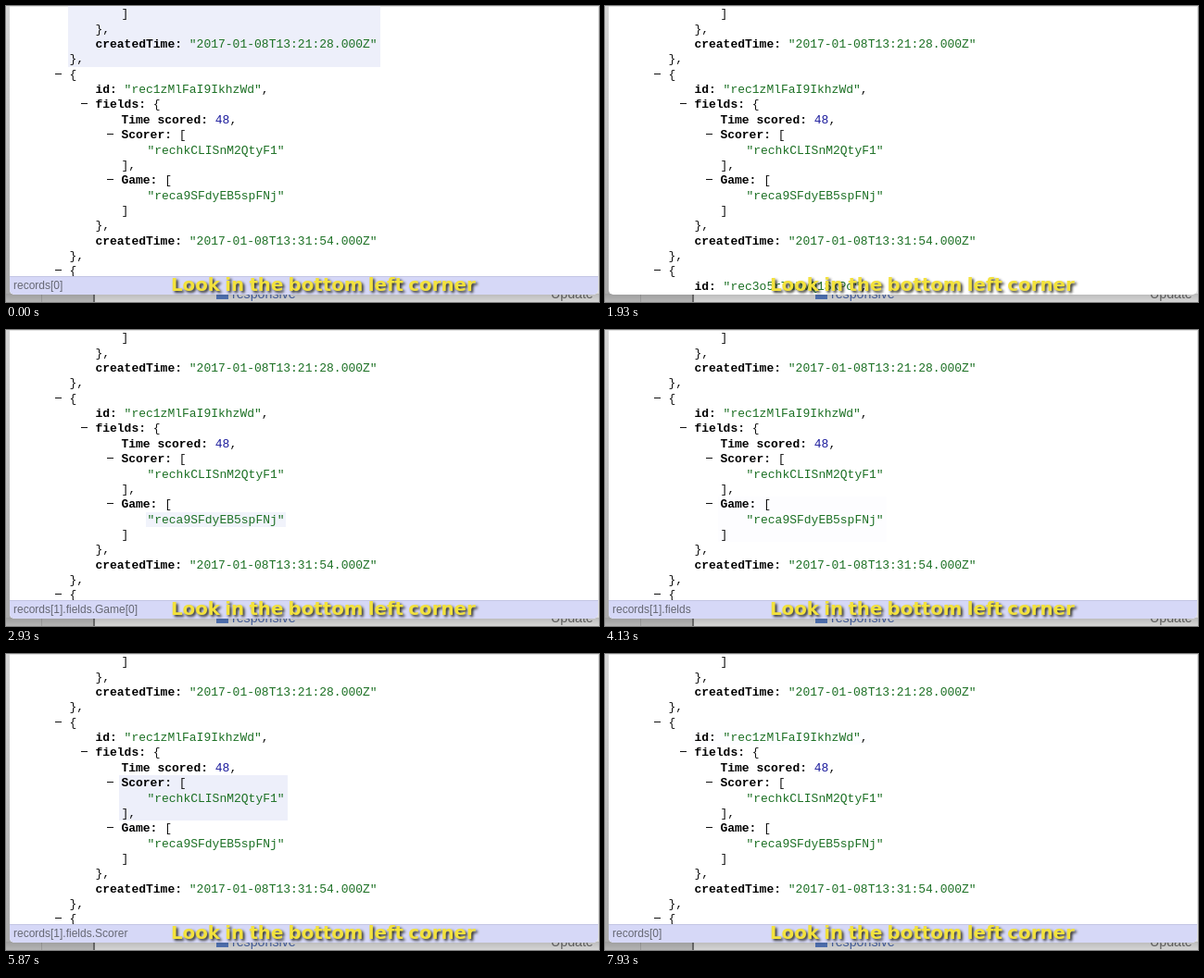
An HTML page with a canvas that plays this animation: 640 px wide and 320 px high, repeating every 8000 ms.

```html
<!DOCTYPE html>
<html lang="en">
<head>
<meta charset="utf-8">
<title>JSON path hover</title>
<style>
html, body { margin: 0; width: 100%; height: 100%; overflow: hidden; background: #fff; }
canvas { display: block; width: 640px; height: 320px; }
</style>
</head>
<body>
<canvas id="stage" width="640" height="320"></canvas>
<script>
const ctx = document.getElementById('stage').getContext('2d');
const LOOP = 8000;
const PITCH = 16.36;
const MONO = '"Liberation Mono", monospace';
const SANS = '"Liberation Sans", sans-serif';
const INK = '#111', GREEN = '#1c7024', BLUE = '#1a1a9c';

// [row, column, bold key, value, value colour, tail]; a leading dash marks a foldable node
const ROWS = [
  [-2, 2, '', ']'],
  [-1, 1, '', '},'],
  [0, 1, 'createdTime:', '"2017-01-08T13:21:28.000Z"', GREEN],
  [1, 0, '', '},'],
  [2, 0, '-', '{'],
  [3, 1, 'id:', '"rec1zMlFaI9IkhzWd"', GREEN, ','],
  [4, 1, '-fields:', '{'],
  [5, 2, 'Time scored:', '48', BLUE, ','],
  [6, 2, '-Scorer:', '['],
  [7, 3, '', '"rechkCLISnM2QtyF1"', GREEN],
  [8, 2, '', '],'],
  [9, 2, '-Game:', '['],
  [10, 3, '', '"reca9SFdyEB5spFNj"', GREEN],
  [11, 2, '', ']'],
  [12, 1, '', '},'],
  [13, 1, 'createdTime:', '"2017-01-08T13:31:54.000Z"', GREEN],
  [14, 0, '', '},'],
  [15, 0, '-', '{'],
  [16, 1, 'id:', '"rec3o5rTuDvQ1SkPo"', GREEN, ',']
];

// path under the pointer, time it enters, highlighted box: left, right, first row, last row
const R1 = 'records[1]', F1 = R1 + '.fields';
const FIELDS = [94, 308, 4, 12];
const SCORER = [122, 304, 6, 8];
const GAME = [122, 304, 9, 11];
const HOVERS = [
  ['records[0]', -1000, [67, 404, -3, 1]],
  ['', 400],
  [R1, 2400, [67, 404, 2, 14]],
  [F1 + '.Game', 2530, GAME],
  [F1 + '.Game[0]', 2630, [151, 302, 10, 10]],
  [F1 + '.Game', 3470, GAME],
  [F1, 4000, FIELDS],
  [F1 + '.Scorer', 4200, SCORER],
  [F1 + '.Scorer[0]', 4670, [151, 302, 7, 7]],
  [F1 + '.Scorer', 5270, SCORER],
  [F1 + '["Time scored"]', 6130, [122, 250, 5, 5]],
  [F1, 6730, FIELDS],
  [R1 + '.id', 7000, [94, 286, 3, 3]],
  ['records[0]', 7810, [67, 404, -3, 1]]
];

const clamp = v => Math.max(0, Math.min(1, v));
const easeOut = v => 1 - Math.pow(1 - clamp(v), 2);

function rect(x, y, w, h, fill) {
  ctx.fillStyle = fill;
  ctx.fillRect(x, y, w, h);
}

function text(str, x, y, font, fill) {
  ctx.font = font;
  ctx.fillStyle = fill;
  ctx.fillText(str, x, y);
  return ctx.measureText(str).width;
}

function fade(colors, x0, y0, x1, y1) {
  const g = ctx.createLinearGradient(x0, y0, x1, y1);
  colors.forEach((c, i) => g.addColorStop(i / (colors.length - 1), c));
  return g;
}

function drawBackdrop() {
  rect(0, 0, 640, 320, '#dedede');
  rect(0, 0, 5, 320, fade(['#d6d6d6', '#a8a8a8'], 0, 0, 0, 320));
  rect(0, 311, 95, 9, '#bcbcbc');
  rect(38, 311, 1, 9, '#a4a4a4');
  rect(94, 311, 2, 9, '#707070');
  rect(227, 309, 13, 8, '#5478bd');
  text('responsive', 244, 316, '14.2px ' + SANS, '#4c67a8');
  text('Update', 588, 316, '14.2px ' + SANS, '#686868');
  rect(0, 311, 640, 9, fade(['rgba(0,0,0,.16)', 'rgba(0,0,0,.04)'], 0, 311, 0, 320));
}

function clipWindow() {
  ctx.beginPath();
  ctx.roundRect(4, -10, 635, 322, 5);
  ctx.clip();
  rect(0, 0, 640, 320, '#fff');
  rect(0, 0, 640, 1, '#e4e4e4');
}

function drawHighlights(t) {
  HOVERS.forEach(([, start, box], i) => {
    if (!box || t < start) return;
    const end = i + 1 < HOVERS.length ? HOVERS[i + 1][1] : LOOP;
    // waits before fading in, fades out at once
    const peak = easeOut((Math.min(t, end) - start - 200) / 200);
    ctx.globalAlpha = peak * (1 - easeOut((t - end) / 200));
    const [left, right, first, last] = box;
    const top = Math.round(33 + first * PITCH);
    const bottom = Math.round(33 + (last + 1) * PITCH);
    rect(left, top, right - left, bottom - top, '#edeffa');
  });
  ctx.globalAlpha = 1;
}

function drawRow([row, col, key, value, color = INK, tail = '']) {
  const y = Math.round(45 + row * PITCH);
  const bold = 'bold 13px ' + MONO, plain = '13px ' + MONO;
  let x = 68.4 + col * 28;
  if (key[0] === '-') {
    rect(53, y - 5, 7, 1, INK);
    if (col) {
      rect(53, y - 5, 7, 1, '#fff');
      rect(53 + col * 28, y - 5, 7, 1, INK);
    }
    key = key.slice(1);
  }
  if (key) x += text(key + ' ', x, y, bold, '#000');
  x += text(value, x, y, plain, color);
  text(tail, x, y, plain, INK);
}

function drawStatus(t) {
  const path = HOVERS.filter(h => h[1] <= t).pop()[0];
  if (!path) return;
  rect(4, 292, 636, 21, '#d6d8f7');
  rect(4, 292, 636, 1, '#c3c5e4');
  text(path, 8, 306, '12px ' + SANS, '#666874');
}

function drawCaption() {
  ctx.save();
  ctx.shadowColor = 'rgba(30,30,20,.9)';
  ctx.shadowOffsetX = 2;
  ctx.shadowOffsetY = 1.5;
  ctx.shadowBlur = 3;
  ctx.wordSpacing = '-1.6px';
  text('Look in the bottom left corner', 178, 308,
    'bold 19.8px "DejaVu Sans", sans-serif', '#f3e23c');
  ctx.restore();
}

function draw(t) {
  drawBackdrop();
  ctx.save();
  clipWindow();
  drawHighlights(t);
  ROWS.forEach(drawRow);
  drawStatus(t);
  ctx.restore();
  drawCaption();
}

const begin = performance.now();
function tick() {
  draw((performance.now() - begin) % LOOP);
  requestAnimationFrame(tick);
}
tick();
</script>
</body>
</html>
```
